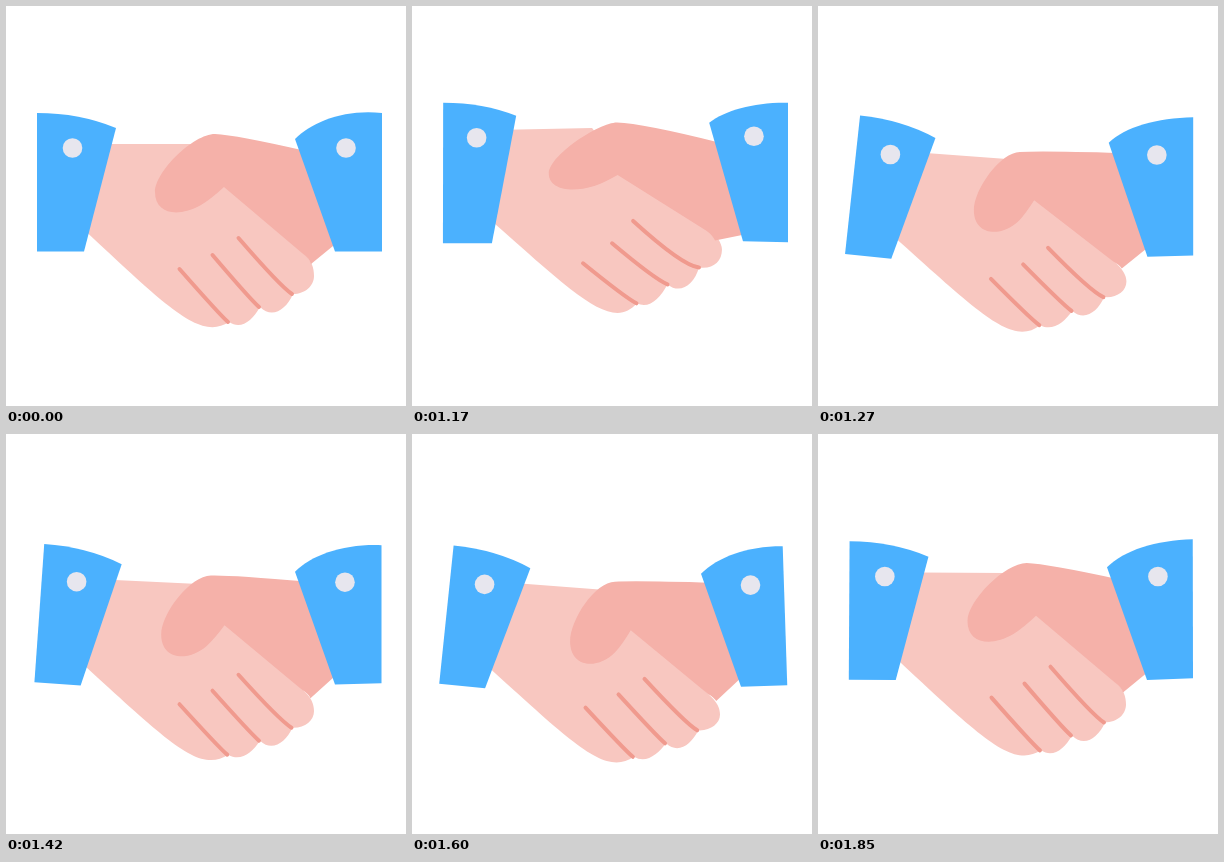
These frames come from a looping animation (400 px wide and 400 px high, 1900 ms). An HTML page without scripts:

```html
<!DOCTYPE html>
<html lang="en">
<head>
<meta charset="utf-8">
<title>Handshake</title>
<style>
  html, body { margin: 0; width: 100%; height: 100%; overflow: hidden; background: #fff; }
  svg { display: block; width: 100%; height: 100%; }

  /* Every part has three poses: rest, up and dip. */
  path { d: var(--rest); animation: shake 1.9s infinite; }

  @keyframes shake {
    0% { d: var(--rest); animation-timing-function: linear; }
    53.684% { d: var(--rest); animation-timing-function: cubic-bezier(.33, .3, .6, 1); }
    60.789% { d: var(--up); animation-timing-function: cubic-bezier(.5, 0, .5, 1); }
    70% { d: var(--dip); animation-timing-function: cubic-bezier(.5, 0, .5, 1); }
    79.737% { d: var(--rest); animation-timing-function: cubic-bezier(.35, .1, .6, 1); }
    86.842% { d: var(--dip2, var(--dip)); animation-timing-function: cubic-bezier(.5, 0, .5, 1); }
    99.474%, 100% { d: var(--end, var(--rest)); }
  }

  .front {
    fill: #f8c7c0;
    --rest: path("M100,138 L188,138 L224,177 L296,246 C306,254 308,262 308,270 C308,280 299,288 287,288 C280,304 266,313 254,301 C246,315 235,324 223,316 C195,334 165,305 80,225.5 L90,185 Z");
    --up: path("M95,123.5 L180,121.5 L212,165 L296,223 C304,227 310,237 310,243 C310,255 301,263 287,261 C282,279 268,288 255.5,278 C248,292 237,303 225,297 C200,325 165,290 80,215 L88,175 Z");
    --dip: path("M107,153 L187,161 L225,197 L296,264 C305,272 308,278 308,284 C308,293 298,300 286,299 C279,313 266,323 254,312 C246,322 234,332 221.5,325 C193,344 165,316 76,236 L90,200 Z");
  }

  .back {
    fill: #f5b1a9;
    --rest: path("M218,181 Q205,193 195,199 C172,212 149,208 149,186 C149,166 187,128 209,128 Q230,129 300,145 L338,231 L305,258 Q304,253 296,247 Z");
    --up: path("M205.5,168.5 Q190,177 182,179.5 C157,187 136.5,182 136.5,167 C136.5,149 187,116 205,116 Q231,117 306,136 L340,227 L303,234 Q300,228 294,224 Z");
    --dip: path("M219,201 Q212,216 206,224 C190,244 161,242 161,214 C161,192 182,154 201,154 Q220,152 302,150 L340,235 L304,270 Q302,267 296,264 Z");
  }

  .creases {
    fill: none; stroke: #f09a8e; stroke-width: 4; stroke-linecap: round;
    --rest: path("M173.5,263 Q214,309 222,316 M206.5,249 Q244,293 253,301 M232.5,232 Q275,281 286,288");
    --up: path("M171,257 Q213,291 224.5,297 M200,237 Q243,273 255.5,278 M221,214.5 Q270,259 287,261");
    --dip: path("M173.5,277 Q212,318 220.5,325 M206.5,264 Q244,304 253,312 M232.5,249 Q273,292 285,299");
  }

  .sleeve { fill: #4bb1fe; }
  .left.sleeve {
    --rest: path("M31,107 Q74,107 110,122 L78,245.5 L31,245.5 Z");
    --up: path("M31,96.6 Q71,96.5 104,109.5 L80,237 L31,237 Z");
    --dip: path("M45,113 Q87.5,118.5 121,138 L71.5,257 L26,251 Z");
  }
  .right.sleeve {
    --rest: path("M289,133 C306,116 338,103 376,107 L376,245.5 L329,245.5 Z");
    --up: path("M297.3,116.4 C314,104 342,96 376,96.6 L376,236 L331,235 Z");
    --dip: path("M289,142 C306,125 338,116 375,115 L375,253 L329,255 Z");
    --dip2: path("M289,142 C306,125 335,115 369,114 L375,253 L329,255 Z");
    --end: path("M289,133 C306,116 338,106 375,105 L375,244 L329,245.5 Z");
  }

  .button { fill: none; stroke: #e7e6ee; stroke-width: 19.6; stroke-linecap: round; }
  .left.button {
    --rest: path("M66.5,142 h.01");
    --up: path("M64.5,131.5 h.01");
    --dip: path("M74.5,153 h.01");
  }
  .right.button {
    --rest: path("M340,142 h.01");
    --up: path("M342,130 h.01");
    --dip: path("M338,154 h.01");
  }
</style>
</head>
<body>
<svg viewBox="0 0 400 400">
  <path class="front"/>
  <path class="back"/>
  <path class="creases"/>
  <path class="left sleeve"/>
  <path class="right sleeve"/>
  <path class="left button"/>
  <path class="right button"/>
</svg>
</body>
</html>
```
